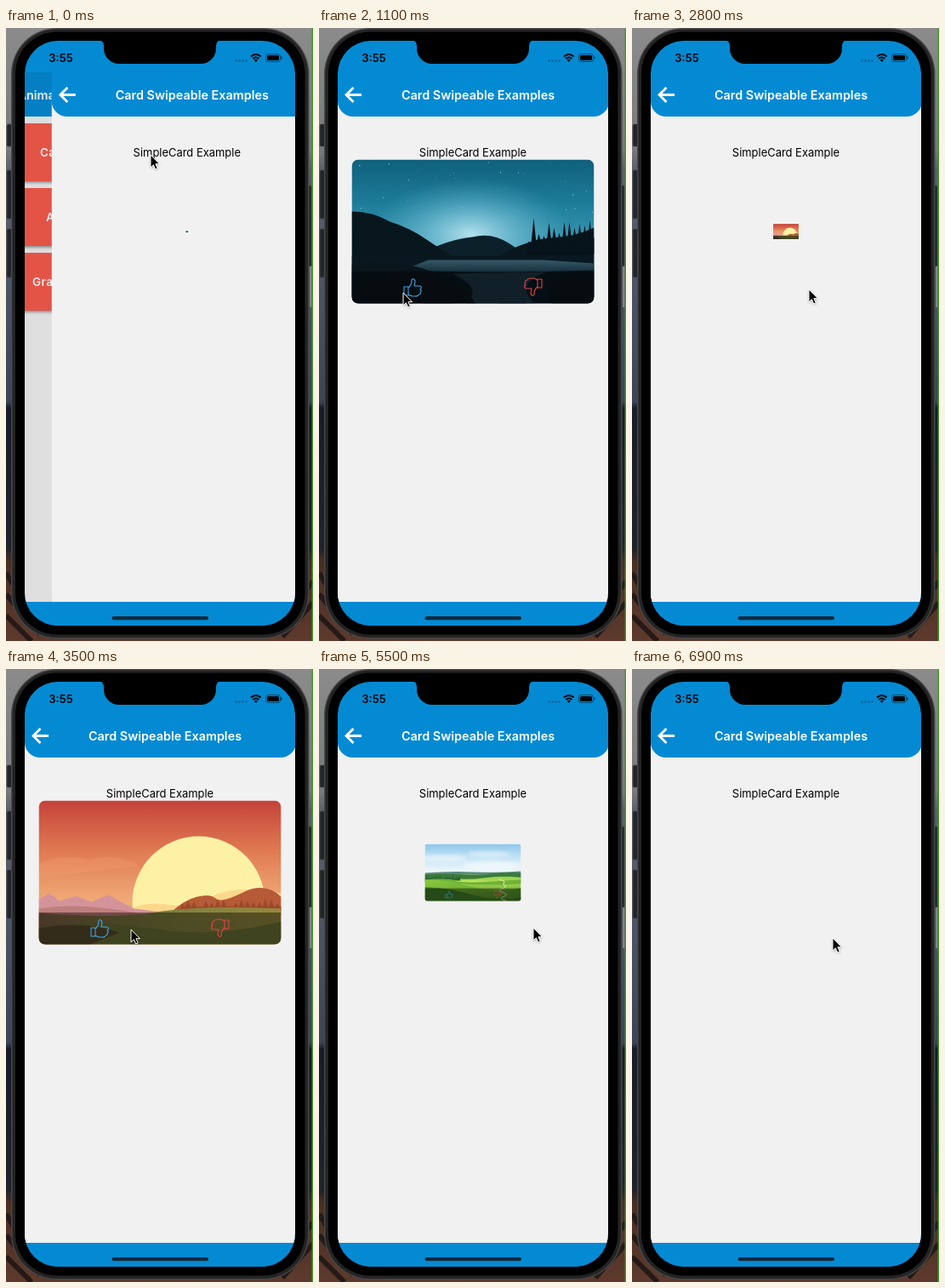
An HTML page that plays this animation: 361x720 px, repeating every 7 s.

```html
<!DOCTYPE html>
<html lang="en">
<head>
<meta charset="utf-8">
<title>Card swipe demo</title>
<style>
  html, body { margin: 0; width: 100%; height: 100%; overflow: hidden; background: #000; }
  svg { display: block; width: 100vw; height: 100vh; }
  text { font-family: Inter, Roboto, sans-serif; }
  .title { font-size: 14.4px; font-weight: 600; fill: #fff; }
  .thumb { fill: none; stroke-width: 1.1; stroke-linejoin: round; stroke-linecap: round; }
</style>
</head>
<body>
<svg viewBox="0 0 361 720" preserveAspectRatio="none">
  <defs>
    <linearGradient id="desk" x2="0" y2="1">
      <stop offset="0" stop-color="#8b8b8b"/><stop offset=".2" stop-color="#77797c"/>
      <stop offset=".23" stop-color="#5b616b"/><stop offset=".42" stop-color="#4b5467"/>
      <stop offset=".61" stop-color="#3c4458"/><stop offset=".62" stop-color="#161c28"/>
      <stop offset=".85" stop-color="#20232c"/><stop offset=".87" stop-color="#4a2d24"/>
      <stop offset="1" stop-color="#5d3a2c"/>
    </linearGradient>
    <linearGradient id="nightSky" x2="0" y2="1">
      <stop offset="0" stop-color="#10607c"/><stop offset=".3" stop-color="#1d7c99"/><stop offset=".6" stop-color="#3d9ab4"/>
    </linearGradient>
    <radialGradient id="glow">
      <stop offset="0" stop-color="#b5e2ee"/><stop offset=".4" stop-color="#7cc3d8" stop-opacity=".7"/>
      <stop offset="1" stop-color="#4aa6c0" stop-opacity="0"/>
    </radialGradient>
    <linearGradient id="lake" x2="0" y2="1">
      <stop offset="0" stop-color="#35596a"/><stop offset="1" stop-color="#152c39"/>
    </linearGradient>
    <linearGradient id="duskSky" x2="0" y2="1">
      <stop offset="0" stop-color="#c5423a"/><stop offset=".35" stop-color="#e07a52"/><stop offset=".7" stop-color="#f0ab76"/>
    </linearGradient>
    <linearGradient id="duskHill" x2="1" y2="0">
      <stop offset="0" stop-color="#7c6046"/><stop offset=".5" stop-color="#7f7f3c"/><stop offset="1" stop-color="#96893f"/>
    </linearGradient>
    <linearGradient id="daySky" x2="0" y2="1">
      <stop offset="0" stop-color="#8cc6ec"/><stop offset=".22" stop-color="#bfe1f5"/><stop offset=".48" stop-color="#eef7fb"/>
    </linearGradient>
    <linearGradient id="meadow" x2="0" y2="1">
      <stop offset="0" stop-color="#8fc64c"/><stop offset=".25" stop-color="#a6d84f"/><stop offset="1" stop-color="#4c932b"/>
    </linearGradient>
    <linearGradient id="slope" x2="1" y2="1">
      <stop offset="0" stop-color="#8cc740"/><stop offset=".5" stop-color="#6aad32"/><stop offset="1" stop-color="#4b8c28"/>
    </linearGradient>
    <clipPath id="screen"><rect x="22" y="15" width="318" height="687" rx="39"/></clipPath>
    <clipPath id="cardEdge"><rect width="285" height="169" rx="8"/></clipPath>
    <filter id="soft" x="-50%" y="-50%" width="200%" height="200%"><feGaussianBlur stdDeviation="1.5"/></filter>
    <filter id="haze" x="-50%" y="-100%" width="200%" height="300%"><feGaussianBlur stdDeviation="6"/></filter>
    <path id="thumb" d="M-10-1H-5V9H-10ZM-5 0C-2-2-1-5-1-9C-1-11 3-11 3-7L2-2H8C11-2 11 1 9 2C11 3 10 5 9 5C10 7 9 8 7 8C7 10 5 10 3 10H0C-2 10-3 9-5 8"/>
  </defs>

  <!-- desktop and phone body -->
  <rect width="361" height="720" fill="url(#desk)"/>
  <path d="M0 640L30 690M0 665L40 712M0 690L30 720M361 650L330 690M361 675L325 715" stroke="#251a18" stroke-width="6"/>
  <path d="M360.3 0V720" stroke="#3b9a22" stroke-width="1.4"/>
  <g fill="#22252a" stroke="#4a4d52" stroke-width=".7">
    <rect x="1" y="113" width="8" height="26" rx="1.5"/>
    <rect x="1" y="167" width="8" height="57" rx="1.5"/>
    <rect x="1" y="236" width="8" height="57" rx="1.5"/>
    <rect x="352" y="185" width="7" height="95" rx="1.5"/>
  </g>
  <path d="M358.3 280V328" stroke="#8b8d90" stroke-width="2"/>
  <rect x="6" y="0" width="350.5" height="717.5" rx="54" fill="#474747"/>
  <rect x="7.5" y="1.5" width="347.5" height="714.5" rx="52" fill="#242424"/>
  <rect x="11" y="4.5" width="340.5" height="708" rx="49" fill="#000"/>

  <g clip-path="url(#screen)">
    <rect x="22" y="15" width="318" height="687" fill="#048ad3"/>
    <g id="previous">
      <rect x="-80" y="52" width="420" height="622" fill="#f1f1f1"/>
      <rect x="-80" y="52" width="420" height="52" fill="#048ad3"/>
      <text class="title" x="13.5" y="84">Animations</text>
      <g id="menu"></g>
      <rect id="dim" x="-80" y="52" width="420" height="622"/>
    </g>
    <g id="page">
      <path d="M22 86H340V674H22Z" fill="#f1f1f1"/>
      <path d="M22 52H341V86A18 18 0 0 1 322 104H40A18 18 0 0 1 22 86Z" fill="#048ad3"/>
      <path d="M50 78.500H32.500M40.500 70L32 78.500L40.500 87" fill="none" stroke="#fff" stroke-width="2.800"/>
      <text class="title" x="187" y="84" text-anchor="middle">Card Swipeable Examples</text>
      <text x="181" y="151" font-size="12.950" text-anchor="middle">SimpleCard Example</text>
      <g id="card"><g clip-path="url(#cardEdge)">
        <g class="scene">
          <rect width="285" height="169" fill="url(#nightSky)"/>
          <ellipse cx="140" cy="88" rx="120" ry="66" fill="url(#glow)"/>
          <g id="stars" fill="#b9e2ea"></g>
          <path d="M85 108Q118 93 142 91Q165 85 186 99L205 112V169H85Z" fill="#0c2029"/>
          <path d="M0 61Q24 61 45 73Q68 80 88 94L118 114V169H0Z" fill="#08161d"/>
          <path d="M172 114Q205 94 235 92T285 80V169H172Z" fill="#08161d"/>
          <path id="pines" fill="#06131a"/>
          <rect y="113" width="285" height="56" fill="#091820"/>
          <path d="M90 118H225L285 122V130L170 133L60 130Z" fill="url(#lake)"/>
          <path d="M118 134L230 132Q190 145 215 169H135Q155 150 118 134Z" fill="#1d3644"/>
          <path d="M0 124Q55 116 95 132T145 169H0ZM285 130Q220 136 235 169H285Z" fill="#0a141b"/>
        </g>
        <g class="scene">
          <rect width="285" height="169" fill="url(#duskSky)"/>
          <path d="M0 74Q35 61 60 70Q90 60 118 77Q60 83 0 90Z" fill="#f2a071" opacity=".3"/>
          <circle cx="188" cy="120" r="78" fill="#fdf1a6"/>
          <path d="M105 129Q125 118 150 122T205 112T285 109V140H105Z" fill="#fbd78b"/>
          <path d="M0 116L12 109L25 118L44 112L62 119L82 111L112 127L145 131V150H0Z" fill="#d4939a"/>
          <path d="M0 127Q50 119 120 133V150H0Z" fill="#bd7f7c"/>
          <path d="M155 132Q170 117 186 113T208 115T240 108T285 113V135Z" fill="#b65a37"/>
          <path id="duskTrees" fill="#9a4a2b"/>
          <path d="M0 132Q75 138 125 133Q185 122 285 127V169H0Z" fill="url(#duskHill)"/>
          <path d="M0 149Q75 140 140 151T285 142V169H0Z" fill="#6d7335"/>
          <path d="M0 150Q50 140 95 155L60 169H0Z" fill="#594b2e"/>
        </g>
        <g class="scene">
          <rect width="285" height="169" fill="url(#daySky)"/>
          <g fill="#fff" opacity=".5" filter="url(#haze)">
            <ellipse cx="55" cy="42" rx="70" ry="10"/><ellipse cx="190" cy="30" rx="65" ry="8"/>
            <ellipse cx="200" cy="62" rx="90" ry="12"/>
          </g>
          <path d="M0 86Q70 80 145 83T285 81V115H0Z" fill="#5a8a80"/>
          <path d="M0 94Q80 88 150 91T285 89V169H0Z" fill="url(#meadow)"/>
          <path d="M0 90Q60 86 110 90T200 88T285 86V99Q230 94 180 100T90 103T0 109Z" fill="#3b7a3d"/>
          <path id="dayTrees" fill="#276430"/>
          <path d="M0 106Q55 100 105 109T220 110L285 106V118Q180 124 100 118T0 116Z" fill="#6fb237"/>
          <path d="M90 111Q140 104 190 110Q150 116 90 111Z" fill="#b9e45c"/>
          <path d="M0 106Q75 106 140 127T285 130V169H0Z" fill="url(#slope)"/>
          <path d="M0 128Q75 130 140 150T285 157V169H0Z" fill="#427f29"/>
          <path d="M220 105Q239 109 235 115Q229 120 240 125Q238 132 224 134Q217 140 236 145Q250 151 231 157Q218 162 242 169" fill="none" stroke="#e5ebcf" stroke-width="2.4"/>
        </g>
        <rect y="131.500" width="285" height="38" fill="#000" opacity=".42"/>
        <use id="like" class="thumb" href="#thumb" x="71.500" y="150.500" stroke="#3da5e4"/>
        <use id="dislike" class="thumb" href="#thumb" transform="translate(213.500 149.500) rotate(180)" stroke="#e0434a"/>
      </g></g>
    </g>
    <text x="64.500" y="40" font-size="13" font-weight="600" text-anchor="middle">3:55</text>
    <path d="M269.500 38.500H284" stroke="#07588a" stroke-width="2" stroke-dasharray="2 2"/>
    <g fill="none" stroke="#000" stroke-width="2">
      <path d="M288 33.500Q293.800 28.500 299.600 33.500M290.200 36Q293.800 33 297.400 36"/>
      <rect x="305.500" y="30.500" width="17" height="9" rx="2.600" stroke-width=".8" opacity=".6"/>
    </g>
    <path d="M291.700 37.500Q293.800 36 295.900 37.500L293.800 40Z"/>
    <rect x="307" y="32" width="14" height="6" rx="1.500"/>
    <path d="M324 33.500V36.500" stroke="#000" stroke-width="1.200" opacity=".6"/>
    <rect x="22" y="674" width="318" height="28" fill="#048ad3"/>
    <rect x="124.500" y="691" width="113.500" height="4.300" rx="2.100" fill="#102b3d"/>
  </g>
  <path d="M109 14Q115 15 115 21V24A18 18 0 0 0 133 42H229A18 18 0 0 0 247 24V21Q247 15 253 14Z"/>

  <g id="cursor">
    <path d="M0 1V16L3.500 13 6 18 8.500 17 6 12H11Z" opacity=".35" filter="url(#soft)"/>
    <path d="M0 0V14.800L3.400 11.700 5.700 17 8.200 15.900 5.900 10.700H10.500Z" stroke="#fff" stroke-width="1"/>
  </g>
</svg>
<script>
const LOOP = 7000, STEP = 100, GROW = 500;
const $ = id => document.getElementById(id);
const scenes = document.querySelectorAll('.scene');

// Each card: when it starts growing and its sideways travel as [time, x].
const cards = [
  { start: -25, drag: [[1300, 0], [1800, 130], [2050, 360]] },
  { start: 2700, drag: [[3500, 0], [3800, -37], [4300, 108], [4400, 133], [4600, 360]] },
  { start: 5282, drag: [[6100, 0], [6300, 13.5], [6500, 82.5], [6800, 360]] }
];
const pointer = [
  [0, 170, 149], [700, 112, 296], [1100, 99, 311], [1300, 100, 310],
  [1800, 230, 308], [2300, 216, 310], [2800, 208, 307], [3300, 147, 306],
  [3500, 147, 306], [3800, 110, 305], [4300, 255, 300], [4400, 280, 301],
  [4600, 262, 304], [4800, 262, 304], [5000, 252, 304], [5500, 252, 304],
  [6100, 237.5, 303], [6300, 251, 303], [6500, 320, 306], [6900, 236, 316]
];

let seed = 7;
const random = () => (seed = seed * 16807 % 2147483647) / 2147483647;

function treeLine(id, from, to, base, height, spread) {
  let d = `M${from} ${base}`;
  for (let x = from; x < to; x += spread) {
    const top = base - height * (0.35 + 0.65 * random());
    d += `L${x + spread / 2} ${top}L${x + spread} ${base - height * 0.3}`;
  }
  $(id).setAttribute('d', `${d}L${to} ${base}Z`);
}
treeLine('pines', 205, 285, 112, 46, 6);
treeLine('duskTrees', 165, 285, 130, 15, 7);
treeLine('dayTrees', 0, 105, 109, 20, 5);

for (let i = 0; i < 35; i++) {
  $('stars').innerHTML += `<circle cx="${285 * random()}" cy="${65 * random()}" r="${0.2 + 0.4 * random()}"/>`;
}

[['Cards', 40], ['Albums', 47], ['Gradients', 31]].forEach(([label, x], i) => {
  const y = 112 + 76 * i;
  $('menu').innerHTML += `<rect x="-80" y="${y + 2}" width="400" height="68" opacity=".35" filter="url(#soft)"/>
    <rect x="-80" y="${y}" width="400" height="68" fill="#f65b4d"/>
    <text x="${x}" y="${y + 39}" font-size="13.500" font-weight="600" letter-spacing=".4" fill="#fff">${label}</text>`;
});

function sample(track, t) {
  const next = track.findIndex(key => key[0] > t);
  if (next === 0) return track[0].slice(1);
  if (next < 0) return track.at(-1).slice(1);
  const a = track[next - 1], b = track[next];
  const p = (t - a[0]) / (b[0] - a[0]);
  return a.slice(1).map((v, i) => v + (b[i + 1] - v) * p);
}

const easeInOut = p => p < 0.5 ? (2 * p) ** 1.7 / 2 : 1 - (2 - 2 * p) ** 1.7 / 2;
const clamp = v => Math.max(0, Math.min(1, v));
const place = (id, transform) => $(id).setAttribute('transform', transform);

function render(t) {
  // Critically damped spring, already most of the way in.
  const k = 3.89 + 0.01826 * t;
  const slide = 318 * (1 + k) * Math.exp(-k);
  place('page', `translate(${slide})`);
  place('previous', `translate(${0.3 * (slide - 31.8)})`);
  $('dim').setAttribute('opacity', 0.08 * (1 - slide / 318) / 0.9);

  const index = cards.findLastIndex(card => t >= card.start);
  const { start, drag } = cards[index];
  const [x] = sample(drag, t);
  const scale = easeInOut(clamp((t - start) / GROW));
  scenes.forEach((scene, i) => scene.style.display = i === index ? '' : 'none');
  place('card', `translate(${181 + x} 239) rotate(${x * 10 / 159}) scale(${scale}) translate(-142.5 -84.5)`);
  $('dislike').setAttribute('opacity', clamp(1 - x / 30));
  $('like').setAttribute('opacity', clamp(1 + x / 30));

  place('cursor', `translate(${sample(pointer, t).join(' ')})`);
}

const origin = performance.now();
function tick() {
  const elapsed = (performance.now() - origin) % LOOP;
  render(Math.floor(elapsed / STEP) * STEP);
  requestAnimationFrame(tick);
}
tick();
</script>
</body>
</html>
```
